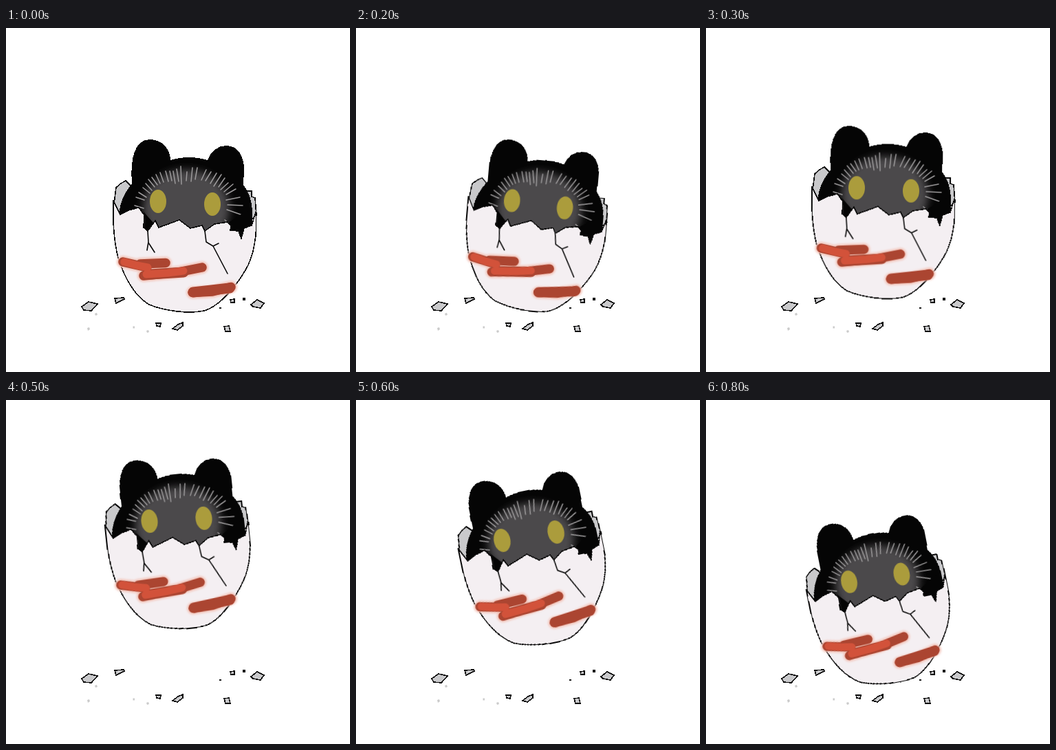
Write an HTML page without scripts that moves like this. It is 500x500 px and loops after 900 ms.

```html
<!DOCTYPE html>
<html lang="en">
<head>
<meta charset="utf-8">
<title>Hopping egg</title>
<style>
  html, body { margin: 0; width: 100%; height: 100%; overflow: hidden; background: #fff; }
  svg { display: block; width: 100%; height: 100%; }
  .line { fill: none; stroke: #080808; stroke-width: 1.6; stroke-linejoin: round; stroke-linecap: round; }
  .crisp { shape-rendering: crispEdges; }
  .shell { fill: #c9c9cb; }
  .hair { fill: none; stroke: #9d9b9c; stroke-width: 1.5; stroke-linecap: round; }
  .smear { fill: none; stroke-linecap: round; stroke-linejoin: round; }

  /* One held pose per ninth of the loop, pivoting between the eyes. */
  #egg {
    transform-origin: 260.5px 254px;
    animation: hop 900ms step-end infinite;
  }
  @keyframes hop {
    0%      { transform: none; }
    11.111% { transform: translate(2.5px, 1px) rotate(2.5deg) scale(.99); }
    22.222% { transform: translate(4.7px, 2.2px) rotate(4.9deg) scale(.98); }
    33.333% { transform: translate(-2px, -19.5px) rotate(.3deg); }
    44.444% { transform: translate(25.5px, -50.2px) rotate(13.8deg); }
    55.555% { transform: translate(-12.5px, -80px) rotate(-6deg); }
    66.666% { transform: translate(-9px, -56px) rotate(-11.7deg); }
    77.777% { transform: translate(-12px, -24px) rotate(-11.5deg) scale(.99); }
    88.888% { transform: translate(-14.3px, 4.7px) rotate(-11.2deg) scale(.975); }
    100%    { transform: none; }
  }
</style>
</head>
<body>
<svg viewBox="0 0 500 500">
  <defs>
    <filter id="soft" x="-30%" y="-30%" width="160%" height="160%"><feGaussianBlur stdDeviation="6"/></filter>
    <filter id="glow" filterUnits="userSpaceOnUse" x="140" y="310" width="230" height="110"><feGaussianBlur stdDeviation="1.5"/></filter>
    <filter id="edge" filterUnits="userSpaceOnUse" x="140" y="310" width="230" height="110"><feGaussianBlur stdDeviation=".7"/></filter>
    <path id="smears" d="M170 340L205 348M195 343L232 341.500M200 360L250 355L285 348M271 384.500L300 383L327 376.500"/>
  </defs>

  <!-- shards on the ground -->
  <g class="line crisp">
    <path class="shell" d="M110 405L120 398L133 401L124 411L113 410ZM158 393L171 392L172 394L160 400ZM356 402L365 395L375 400L370 407L359 405ZM242 437L250 431L257 428V433L249 439ZM317 434L324 433L326 441L319 441ZM218 429L225 429L224 434L219 433ZM326 395L332 394V399H327Z"/>
    <path fill="#080808" d="M345 393h2v2h-2zM311 406.500h1v1h-1z"/>
  </g>
  <path fill="#cbcbcb" d="M118 436l3-1 1 3-3 2zM129 415l3-1 1 3-3 1zM184.500 433.500h2.500v3h-2.500zM204 440l3-1 1 3-3 1z"/>

  <g id="egg">
    <!-- far side of the shell -->
    <path class="line shell crisp" d="M157 255L160 232L167 226L174 222L180 228L190 260L165 275ZM348 237H357V245L362 247L364 272L350 285Z"/>

    <!-- creature -->
    <path class="crisp" fill="#050505" d="M183 226C180 190 187 162 209 162C229 162 239 178 239 192Q266 184 293 192C297 180 307 171 320 171C338 171 346 187 346 206L345 228C354 239 357 252 358 265L358 300L330 315H190L164 270C166 252 172 240 183 226Z"/>
    <ellipse cx="262" cy="262" rx="63" ry="56" fill="#4c4a4b" filter="url(#soft)"/>
    <path class="hair" d="M187 258l13 4M189 246l12 4M193 239l11 7M199 232l10 8M203 226l9 10M207 220l9 11M212 217l8 11M218 213l6 13M224 210l5 14M232 208l4 15M238 208l3 14M243 208l3 18M248 205l3 18M254 201l1 26M263 209l-1 13M271 203l-2 20M278 203l-3 17M291 206l-7 15M298 209l-8 13M306 211l-9 15M313 213l-11 17M318 218l-9 13M323 225l-11 10M330 227l-13 11M334 234l-14 8M340 246l-20 4M344 258l-22-1M341 271l-20-7M328 287l-10-8"/>
    <g fill="#ab9c3c">
      <ellipse cx="221" cy="252" rx="12" ry="17"/>
      <ellipse cx="300" cy="256" rx="12" ry="17"/>
    </g>
    <path fill="#050505" d="M199 266L202 274V296H206L215 284L206 274ZM323 283L327 296L342 308L358 296V265L346 268Z"/>

    <!-- near side of the shell -->
    <path class="line crisp" style="fill:#f4eff2" d="M156 251L166 271L178 265L193 261L201 272L200 290L206 295L217 280L222 290L252 279L268 291L285 287L289 295L303 285L322 282L327 288L326 294L338 295L342 306L346 291L357 287L363 268C366 300 360 332 348 352C338 369 314 403 288 411C265 416 230 411 208 402C185 388 172 362 163 334C157 310 155 280 156 251Z"/>

    <g class="smear">
      <use href="#smears" stroke="#f3c4b9" stroke-width="18" filter="url(#glow)"/>
      <g filter="url(#edge)">
        <use href="#smears" stroke="#ab4531" stroke-width="13.500"/>
        <path stroke="#ab4531" stroke-width="15" d="M210 358L258 355M272 384L325 378"/>
        <path stroke="#d2523a" stroke-width="11" d="M172 340L190 345L206 348M204 358L235 356L258 353"/>
      </g>
    </g>
    <path class="line" d="M206 295L207 311L205 323M207 312L216 326M289 295L291 311L301 317L322 357M301 317L309 313"/>
  </g>
</svg>
</body>
</html>
```
